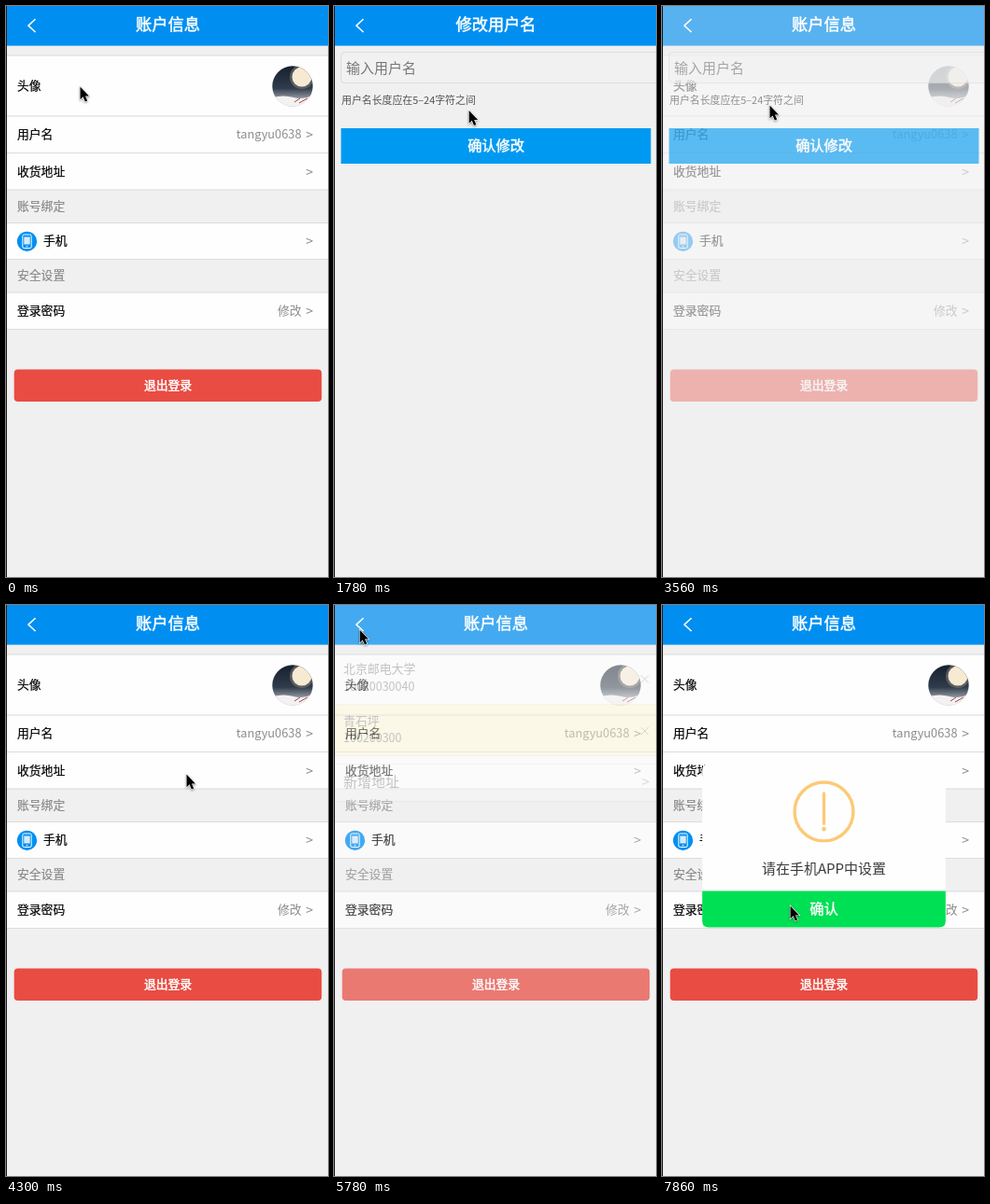
Write an HTML page that moves like this. It is 345 px wide and 612 px high and loops after 8000 ms.

```html
<!DOCTYPE html>
<html lang="zh-CN">
<head>
<meta charset="utf-8">
<style>
html, body { margin: 0; height: 100%; overflow: hidden; background: #f0f0f0; }
svg { display: block; width: 345px; height: 612px; font-family: "Noto Sans CJK SC", "Noto Sans CJK", "Noto Sans", sans-serif; }
.medium { stroke: #fff; stroke-width: .5px; fill: #fff; text-anchor: middle; }
#cursor { filter: drop-shadow(0 1px 1px #0006); }
</style>
</head>
<body>
<svg id="stage" viewBox="0 0 345 612"></svg>
<script>
const BLUE = '#008ff1', AMBER = '#fdc978', WHITE = '#fefefe';
const stage = document.getElementById('stage');

const rect = (x, y, w, h, fill, extra = '') =>
  `<rect x="${x}" y="${y}" width="${w}" height="${h}" fill="${fill}" ${extra}/>`;
// y is the visual middle of the line
const text = (s, x, y, size, fill, extra = '') =>
  `<text x="${x}" y="${y + size * .33}" font-size="${size}" fill="${fill}" ${extra}>${s}</text>`;
const caption = (s, x, y, size, id = '') => text(s, x, y, size, '#fff', `class="medium" ${id}`);
const line = y => rect(1, y - .5, 344, 1, '#dcdcdc');
const panel = (y, h) => rect(1, y, 344, h, WHITE) + line(y) + line(y + h);
const more = (y, s = '') =>
  text(s, 316.5, y, 12.8, '#8c8c8c', 'text-anchor="end"') + text('&gt;', 329, y, 14, '#8c8c8c', 'text-anchor="end"');
const label = (s, y, x = 12) => text(s, x, y, 12.8, '#000', 'stroke="#000" stroke-width=".2"');
const section = (s, y) => text(s, 12, y, 12.8, '#888', 'stroke="#888" stroke-width=".2"');

const avatar = `
  <clipPath id="round"><circle cx="307" cy="86" r="21.7"/></clipPath>
  <linearGradient id="night" x2="0" y2="1">
    <stop offset="0" stop-color="#161f2e"/><stop offset=".55" stop-color="#303c4c"/>
    <stop offset=".85" stop-color="#a9abb3"/>
  </linearGradient>
  <g clip-path="url(#round)">${rect(285, 64, 44, 44, 'url(#night)')}
    <circle cx="317" cy="76" r="13" fill="#8d8578" opacity=".5"/>
    <circle cx="317" cy="76" r="10.5" fill="#f7ead3"/>
    <path d="M285 98Q298 95 308 98T330 95V109H285Z" fill="#f3f1f2"/>
    <path d="M309 103l6-4m-1 5l9-5" stroke="#a4483f"/>
  </g>`;

const phone = `<circle cx="22.5" cy="252.3" r="10.6" fill="${BLUE}"/>
  ${rect(17.8, 245, 9.4, 14.5, BLUE, 'rx="1.5" stroke="#fff"')}${rect(19.3, 247.5, 6.4, 8, '#d5ecfd')}
  <circle cx="22.5" cy="257.5" r=".8" fill="#fff"/>`;

const pages = {
  account: panel(53, 144) + line(118) + line(157.5) + panel(232.5, 39) + panel(307, 39.5) +
    label('头像', 86) + avatar +
    label('用户名', 138) + more(138, 'tangyu0638') +
    label('收货地址', 178) + more(178) +
    section('账号绑定', 215) + phone + label('手机', 252, 40) + more(252) +
    section('安全设置', 289) + label('登录密码', 327) + more(327, '修改') +
    rect(8.7, 389.6, 329.5, 34.5, '#e84c42', 'rx="4"') + caption('退出登录', 173.5, 407, 12.8),
  rename: rect(7.5, 49.5, 342, 33, '#f1f1f1', 'rx="4" stroke="#dcdcdc"') +
    text('输入用户名', 13, 67, 15, '#777') +
    text('用户名长度应在5–24字符之间', 8, 101, 10.9, '#555') +
    rect(7.5, 131, 332, 38, '#0099f1') + caption('确认修改', 173.5, 150, 15.2),
  address: panel(53, 53.5) + rect(1, 106.5, 344, 55, '#fff3bc') + line(161.5) + panel(170.5, 40) +
    text('北京邮电大学', 10, 69, 12.9, '#333') + text('10020030040', 10, 87.5, 12.5, '#333') +
    text('青石坪', 10, 125, 12.9, '#333') + text('100200300', 10, 143, 12.5, '#333') +
    [79.5, 135].map(y => `<path d="M329 ${y - 4}l8 8m0-8l-8 8" stroke="#777"/>`).join('') +
    text('新增地址', 10, 190, 15, '#333') + text('&gt;', 338, 190.5, 15, '#888', 'text-anchor="end"')
};
const titles = { account: '账户信息', rename: '修改用户名', address: '收货地址' };

const dialog = rect(-153.5, -103, 307, 206, WHITE, 'rx="7"') + `
  <path d="M-153.5 57h307v38q0 8-8 8h-291q-8 0-8-8Z" fill="#00e054"/>
  <g fill="none" stroke="${AMBER}" stroke-width="4"><circle cy="-43" r="37"/>
  <path d="M0-66V-28" stroke-linecap="round"/></g><circle cy="-21" r="2.7" fill="${AMBER}"/>` +
  text('请在手机APP中设置', 0, 30, 17.7, '#3c3c3c', 'text-anchor="middle"') + caption('确认', 0, 80, 18);

stage.innerHTML = rect(0, 0, 345, 612, '#f0f0f0') + rect(1, 0, 344, 42.6, BLUE, 'id="header"') +
  '<g id="pages">' + Object.keys(pages).map(k => `<g id="${k}">${pages[k]}</g>`).join('') + '</g>' +
  '<path d="M31.500 14L24 21l7.500 7" fill="none" stroke="#fff" stroke-width="1.6"/>' +
  caption('', 173.5, 20.6, 17.2, 'id="title"') + `<g id="dialog">${dialog}</g>
  <path id="cursor" d="M.5 .5V14.2L3.6 11.3 5.8 16.4 8.2 15.4 6 10.4H10Z" stroke="#fff" stroke-width="1.2" paint-order="stroke"/>` +
  rect(0, 0, 1, 612, '#1c1c1c');

const el = id => document.getElementById(id);
const set = (id, name, value) => el(id).setAttribute(name, value);
const ease = x => (x = Math.max(0, Math.min(1, x)), x * x * (3 - 2 * x));

// Start of each page change and the page it leads to
const visits = [[-500, 'account'], [1221, 'rename'], [3350, 'account'], [4500, 'address'], [5453, 'account']];
// Arrival time and place of each pointer move
const stops = [
  [0, 79, 86], [437, 73, 89], [1037, 149, 121], [2223, 120, 64], [2964, 34, 21],
  [3853, 193, 188], [4298, 193, 181], [5440, 27, 26], [6370, 128, 254], [7700, 137, 322]
];
const popups = [6375, 7824];

function pointer(t) {
  let [last, x, y] = stops[0];
  for (const [end, nx, ny] of stops.slice(1)) {
    const start = Math.max(last, end - 600), p = ease((t - start) / (end - start));
    x += (nx - x) * p;
    y += (ny - y) * p;
    last = end;
  }
  return `translate(${x} ${y})`;
}

function draw(t) {
  const i = visits.findLastIndex(v => v[0] <= t), [start, to] = visits[i];
  const from = i ? visits[i - 1][1] : 'rename', p = ease((t - start) / 500);
  for (const k in pages) set(k, 'opacity', k === to ? p : k === from ? 1 - p : 0);
  if (el('pages').lastChild !== el(from)) el('pages').append(el(from));
  set('header', 'opacity', Math.max(p, 1 - p));
  el('title').textContent = titles[to];

  // The dialog springs open from 70 %
  const opened = popups.find(s => t >= s && t < s + 400), u = (t - opened) / 300;
  set('dialog', 'visibility', opened ? 'visible' : 'hidden');
  if (opened) set('dialog', 'transform', `translate(173.5 258) scale(${1 - .3 * Math.exp(-4 * u) * Math.cos(7 * u)})`);
  set('cursor', 'transform', pointer(t));
}

const STEP = 148.2;
function tick() {
  draw(Math.floor(performance.now() % 8000 / STEP) * STEP);
  requestAnimationFrame(tick);
}
tick();
</script>
</body>
</html>
```
